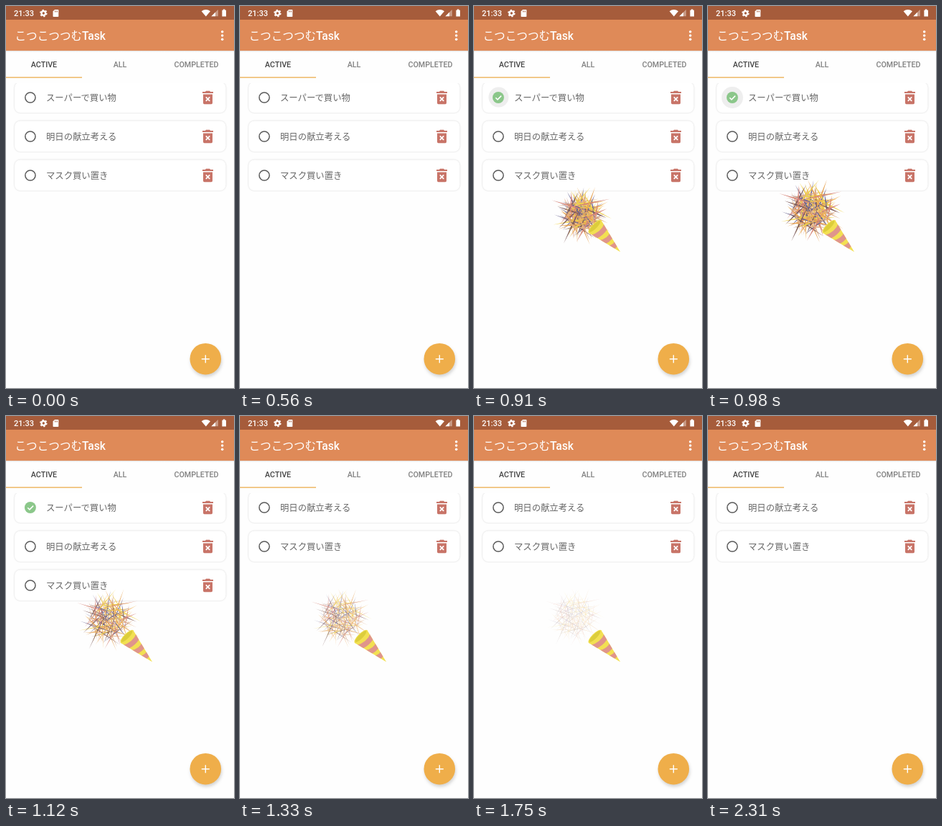
These frames come from a looping animation (318x530 px, 2.59 s). An HTML page:

```html
<!DOCTYPE html>
<html lang="ja">
<head>
<meta charset="utf-8">
<title>Todo list</title>
<style>
  html, body { margin: 0; width: 100%; height: 100%; overflow: hidden; background: #fefefe; }
  svg { display: block; width: 100vw; height: 100vh; }
  text { font-family: Roboto, "Noto Sans CJK JP", "Noto Sans CJK", sans-serif; }
  .tab { font-size: 10.7px; font-weight: 500; text-anchor: middle; fill: #808080; }
  .label { font-size: 12.35px; font-weight: 300; fill: #666; }
  .card { fill: #fff; filter: drop-shadow(0 .9px .9px rgba(0,0,0,.17)); }
  .fab { fill: #efae4a; filter: drop-shadow(1.5px 3px 2px rgba(0,0,0,.17)); }
</style>
</head>
<body>
<svg viewBox="0 0 318 530" preserveAspectRatio="none">
  <defs>
    <clipPath id="list"><rect y="107" width="318" height="423"/></clipPath>
    <clipPath id="coneShape"><path d="M0-12.4L50 0 0 12.4Q-4 0 0-12.4Z"/></clipPath>
    <linearGradient id="drop" x2="0" y2="1">
      <stop stop-color="#000" stop-opacity=".12"/><stop offset="1" stop-color="#000" stop-opacity="0"/>
    </linearGradient>
    <g id="bin">
      <path fill="#c87468" d="M-2.6-9.3h5.2l1 1.2h3.9v2.1h-15v-2.1h3.9zM-6.5-4.6h13v12.2q0 1.7-1.7 1.7h-9.6q-1.7 0-1.7-1.7z"/>
      <path d="M-2.7-.6l5.4 5.4m0-5.4l-5.4 5.4" stroke="#fff" stroke-width="1.7"/>
    </g>
  </defs>
  <rect width="318" height="530" fill="#fefefe"/>

  <g clip-path="url(#list)" id="cards"></g>

  <rect y="62" width="318" height="2" fill="url(#drop)"/>
  <rect width="318" height="62" fill="#df8a58"/>
  <rect width="318" height="19" fill="#a65c3b"/>
  <g fill="#fff">
    <text x="11" y="13.8" font-size="11" font-weight="500">21:33</text>
    <circle cx="52.3" cy="10" r="2.8" fill="none" stroke="#fff" stroke-width="2.2"/>
    <circle cx="52.3" cy="10" r="4.5" fill="none" stroke="#fff" stroke-width="1.5" stroke-dasharray="2.3 2.41"/>
    <path d="M68 5h4.5q.8 0 .8.8v8.4q0 .8-.8.8h-6.2q-.8 0-.8-.8V7.6z"/>
    <path d="M68.3 6.5v2m1.6-2v2m1.6-2v2" stroke="#a65c3b" stroke-width=".8"/>
    <path d="M272.6 7.2q6.2-4.6 12.4 0l-6.2 7.2z"/>
    <path d="M286.4 14.3l9.4-9.4v9.4z" opacity=".4"/>
    <path d="M286.4 14.3l5.6-5.6v5.6z"/>
    <path d="M302.8 4.5h2.6v1.2h1.6v8.8h-5.6V5.7h1.4z"/>
    <text x="12.5" y="46.8" font-size="15.6" font-weight="500"><tspan font-weight="400">こつこつつむ</tspan>Task</text>
    <circle cx="301.7" cy="35.8" r="1.75"/><circle cx="301.7" cy="41" r="1.75"/><circle cx="301.7" cy="46.2" r="1.75"/>
  </g>
  <text class="tab" x="53" y="85" style="fill:#444">ACTIVE</text>
  <text class="tab" x="159" y="85">ALL</text>
  <text class="tab" x="265.5" y="85">COMPLETED</text>
  <rect y="98.4" width="106" height="1.5" fill="#efb866"/>

  <g id="burst"></g>
  <g id="cone">
    <g clip-path="url(#coneShape)">
      <rect x="-5" y="-14" width="56" height="28" fill="#f2e052"/>
      <path d="M9-15Q16 0 7 15M23-12Q29 0 20 12M36-9Q41 0 34 9" fill="none" stroke="#e0958b" stroke-width="7"/>
    </g>
    <ellipse rx="4.2" ry="12.4" fill="#f2e052"/>
    <ellipse cx="-.3" rx="3" ry="10.8" fill="#dccd3c"/>
  </g>

  <circle class="fab" cx="278.3" cy="489.7" r="21.8"/>
  <path d="M272.8 489.7h11m-5.5-5.5v11" stroke="#fff" stroke-width="1.4"/>
</svg>
<script>
const LOOP = 2590, STEP = 70, CHECKED = 700, REMOVED = 1260;
const labels = ["スーパーで買い物", "明日の献立考える", "マスク買い置き"];
const colors = ["#efd24c", "#6b6590", "#e6a355", "#d58478", "#7d5b5b", "#f0b45a", "#dfae86"];

// Keyframes are [time, value] pairs
const rippleSize = [[630, 0], [700, 6], [770, 9.5], [840, 12], [910, 14], [980, 15]];
const rippleFade = [[980, 1], [1050, .5], [1120, 0]];
const travel = [[700, 0], [770, .05], [840, .45], [910, .8], [980, 1], [1470, 1.15]];
const reach = [[980, 1], [1120, .95], [1470, .85]];
const girth = [[770, .95], [980, 1.05], [1050, .85], [1120, .6], [1470, .32], [1750, .24]];
const burstFade = [[1120, 1], [1470, .72], [1680, .48], [1750, .36], [1820, 0]];
const coneSize = [[560, 0], [630, .5], [700, .9], [770, 1]];
const coneFade = [[2030, 1], [2310, 0]];

const $ = id => document.getElementById(id);

function at(keys, t) {
  if (t <= keys[0][0]) return keys[0][1];
  for (let i = 1; i < keys.length; i++) {
    const [t0, v0] = keys[i - 1], [t1, v1] = keys[i];
    if (t <= t1) return v0 + (v1 - v0) * (t - t0) / (t1 - t0);
  }
  return keys[keys.length - 1][1];
}

function add(parent, tag, attrs) {
  const el = document.createElementNS(parent.namespaceURI, tag);
  for (const k in attrs) el.setAttribute(k, attrs[k]);
  return parent.appendChild(el);
}

let seed = 41;
const rand = () => (seed = seed * 16807 % 2147483647) / 2147483647;

const cards = labels.map(label => {
  const g = add($("cards"), "g", {});
  g.innerHTML = `<rect class="card" x="12" y="-21.5" width="294.5" height="42.5" rx="8"/>
    <circle class="ripple" fill="#eee"/>
    <circle class="ring" cx="33.9" r="7.1" fill="none" stroke="#5a5a5a" stroke-width="1.5"/>
    <g class="tick" visibility="hidden"><circle cx="33.9" r="8" fill="#8bc78a"/>
      <path d="M30.2.2l2.7 2.7 5.2-5.3" fill="none" stroke="#fff" stroke-width="1.5"/></g>
    <text class="label" x="56" y="4.7">${label}</text>
    <use href="#bin" x="281.5"/>`;
  return g;
});
const [ripple, ring, tick] = [".ripple", ".ring", ".tick"].map(s => cards[0].querySelector(s));

// Stars sit on a spiral; each has three crossing spikes
const STARS = 36;
const spikes = Array.from({ length: STARS * 3 }, (_, n) => {
  const i = Math.floor(n / 3), r = 25 * Math.sqrt((i + .5) / STARS);
  return {
    star: i, x: Math.cos(i * 2.4) * r, y: Math.sin(i * 2.4) * r,
    a: i * 1.3 + (n % 3) * Math.PI / 3 + rand() * .6, len: 15 + rand() * 15,
    el: add($("burst"), "path", { fill: colors[Math.floor(rand() * colors.length)] })
  };
});

// Thin diamond with its long axis at angle a
function diamond(x, y, a, len, w) {
  const c = Math.cos(a), s = Math.sin(a);
  const pt = (u, v) => (x + u * c - v * s).toFixed(2) + " " + (y + u * s + v * c).toFixed(2);
  return `M${pt(len, 0)}L${pt(0, w)}L${pt(-len, 0)}L${pt(0, -w)}Z`;
}

function drawBurst(t) {
  const p = at(travel, t), size = at(reach, t), w = at(girth, t), spread = Math.min(p, 1);
  const count = p === 0 ? 0 : p < .1 ? 4 : STARS;
  $("burst").setAttribute("opacity", at(burstFade, t));
  for (const k of spikes) {
    const x = 173 - 28 * p + k.x * spread, y = 315 - 32 * p + k.y * spread;
    k.el.setAttribute("d", k.star < count ? diamond(x, y, k.a, k.len * size, w) : "");
  }
}

function draw(t) {
  const removed = t >= REMOVED, checked = t >= CHECKED;
  cards.forEach((g, i) => {
    g.setAttribute("transform", `translate(0 ${127 + 54 * (removed ? i - 1 : i)})`);
    g.setAttribute("visibility", removed && i === 0 ? "hidden" : "visible");
  });
  ring.setAttribute("visibility", removed || checked ? "hidden" : "visible");
  tick.setAttribute("visibility", !removed && checked ? "visible" : "hidden");
  const r = at(rippleSize, t), off = (15 - r) * .4;
  ripple.setAttribute("r", r);
  ripple.setAttribute("cx", 33.9 + off);
  ripple.setAttribute("cy", -off);
  ripple.setAttribute("opacity", at(rippleFade, t));
  $("cone").setAttribute("transform", `translate(168.7 306) rotate(45) translate(50 0) scale(${at(coneSize, t)}) translate(-50 0)`);
  $("cone").setAttribute("opacity", at(coneFade, t));
  drawBurst(t);
}

const start = performance.now();
let last = 0;
function loop(now) {
  const t = Math.floor(Math.max(0, now - start) % LOOP / STEP) * STEP;
  if (t !== last) draw(last = t);
  requestAnimationFrame(loop);
}
draw(0);
requestAnimationFrame(loop);
</script>
</body>
</html>
```
